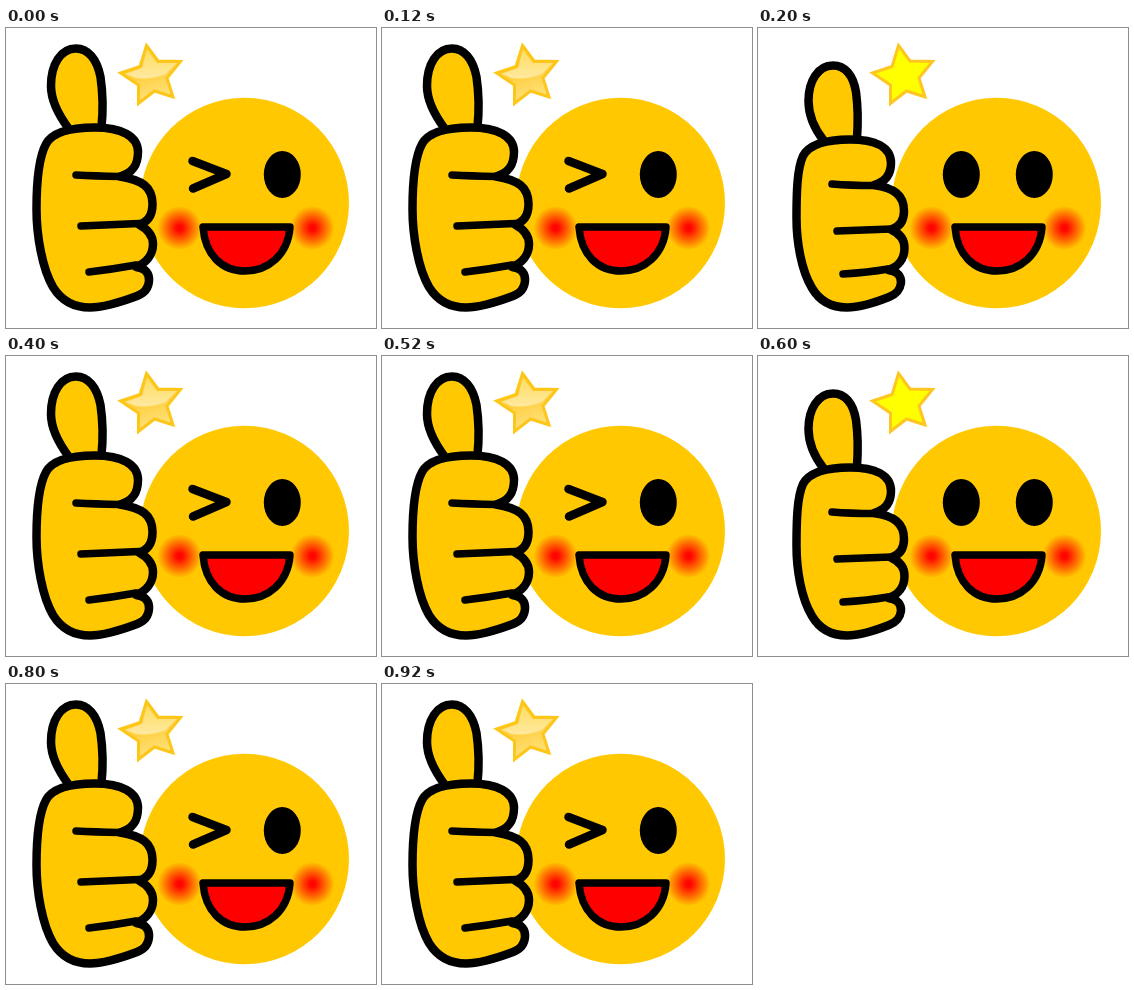
An HTML page without scripts for the animation above (1 s loop, 370 by 300 pixels).

```html
<!DOCTYPE html>
<html lang="en">
<head>
<meta charset="utf-8">
<title>Winking thumbs up</title>
<style>
  html, body { margin: 0; width: 100%; height: 100%; overflow: hidden; background: #fff; }
  svg { display: block; width: 100%; height: 100%; }
  .line { stroke: #000; stroke-width: 8.5; stroke-linecap: round; stroke-linejoin: round; }
  .thin { stroke-width: 7.5; }
  .skin { fill: #ffc800; }
  .none { fill: none; }
  .wink { animation: wink 1s step-end infinite; }
  .open { opacity: 0; animation: open 1s step-end infinite; }
  @keyframes wink { 0%, 40%, 80% { opacity: 1 } 20%, 60% { opacity: 0 } 100% { opacity: 1 } }
  @keyframes open { 0%, 40%, 80% { opacity: 0 } 20%, 60% { opacity: 1 } 100% { opacity: 0 } }
</style>
</head>
<body>
<svg viewBox="0 0 370 300">
  <defs>
    <radialGradient id="blush">
      <stop offset="0" stop-color="#f00"/>
      <stop offset=".15" stop-color="#ff0a00"/>
      <stop offset="1" stop-color="#ffc800"/>
    </radialGradient>
    <linearGradient id="gold" x2=".3" y2="1">
      <stop offset=".4" stop-color="#ffc928"/>
      <stop offset="1" stop-color="#ffe07a"/>
    </linearGradient>
    <linearGradient id="gloss" x2="0" y2="1">
      <stop offset="0" stop-color="#ffdc60"/>
      <stop offset="1" stop-color="#ffe9a0"/>
    </linearGradient>
    <path id="star" d="M140.500 17.500 152 33 174.500 33.500 161 50 167 69 148.500 63 132.500 75.500 132.500 57 114.500 45 134 38.500Z"/>
    <clipPath id="inside"><use href="#star"/></clipPath>
    <ellipse id="eye" cy="146.500" rx="18.500" ry="23.500"/>
    <circle id="cheek" cy="200" r="22" fill="url(#blush)"/>
  </defs>

  <ellipse class="skin" cx="238.500" cy="175" rx="104.500" ry="105.300"/>
  <use href="#cheek" x="173.500"/>
  <use href="#cheek" x="306.500"/>
  <path class="line thin" fill="#f00" d="M197 199H284C282 227 262 243 239 243S199 227 197 199Z"/>
  <use href="#eye" x="276.300"/>

  <g class="wink">
    <path class="line none" d="M186.500 133 220.500 146 187 160.500"/>
    <use href="#star" fill="url(#gold)" stroke="#ffc61a" stroke-width="3"/>
    <path clip-path="url(#inside)" fill="url(#gloss)" d="M119 46 136 40 141 21 151 35 171 35 160 46Q144 52 130 50Z"/>
    <path class="line skin" d="M63 101C51 85 45 72 45 58C45 36 55 20.500 70 20.500C82 20.500 91 31 94.500 49C97 66 97 84 95.500 99"/>
    <path class="line skin" d="M40 116C47 103 67 99.500 89 99.500C115 99.500 132 108 132 124C132 138 126 145 114 148.500C136 152 146.500 159 146.500 176C146.500 187 142 194 133 196.500C143 202 147 209 147 216C147 227 140 235 130 239C140 240 143.500 246 143 253C142.500 260 139 265 131 268C115 274 98 279.500 84 279.500C67 279.500 55 272 47 259C36 240 30.500 207 30.500 181C30.500 155 33 129 40 116Z"/>
    <path class="line none thin" d="M70 147Q88 148 114 148.500M75 198 133 195.500M83 244Q108 241 130 237"/>
  </g>

  <g class="open">
    <use href="#eye" x="203.300"/>
    <use href="#star" fill="#ff0" stroke="#ffc520" stroke-width="3"/>
    <path class="line skin" d="M66 113C55 99 50.500 87 50.500 73C50.500 53 60 37.500 75 37.500C87 37.500 95 47 98 64C100 79 100 96 99 110"/>
    <path class="line skin" d="M45 128C52 115 70 111.500 92 111.500C117 111.500 133 119 133 135C133 147 127 154 116 157C136 160 146 167 146 183C146 193 142 199 133 201.500C143 206 146.500 213 146.500 220C146.500 231 140 239 130 242C140 243 143.500 249 143 255C142 262 139 266 131 269C116 275 102 279.500 89 279.500C73 279.500 61 272 54 260C43 242 38.500 213 38.500 190C38.500 165 39 141 45 128Z"/>
    <path class="line none thin" d="M74 156Q92 157.500 116 157.500M79 203 133 201M85 246Q110 244.500 130 241"/>
  </g>
</svg>
</body>
</html>
```
